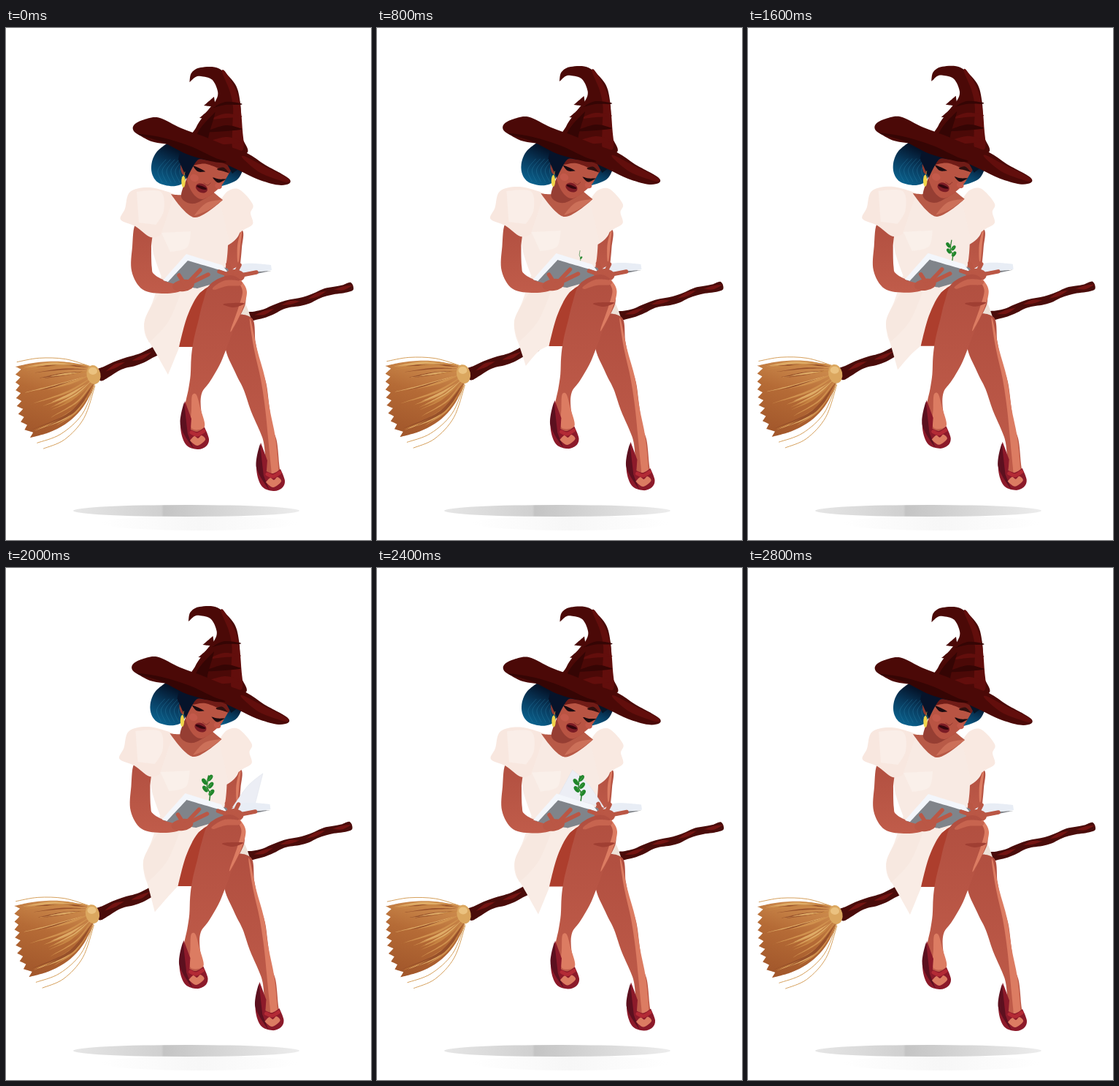
Animation, 500 px wide and 700 px high, one loop 3000 ms. Source, as an HTML page:

```html
<!DOCTYPE html>
<html lang="en">
<head>
<meta charset="utf-8">
<title>Reading on a broom</title>
<style>
html, body { margin: 0; width: 100%; height: 100%; overflow: hidden; background: #fff; }
svg { display: block; width: 500px; height: 700px; }
</style>
</head>
<body>
<svg viewBox="0 0 500 700">
  <defs>
    <linearGradient id="bristle" x1=".7" y1="0" x2=".4" y2="1">
      <stop offset="0" stop-color="#d09050"/><stop offset=".45" stop-color="#b56b36"/><stop offset="1" stop-color="#a2572b"/>
    </linearGradient>
    <linearGradient id="hair" x1=".7" y1="0" x2=".3" y2="1">
      <stop offset=".25" stop-color="#04142a"/><stop offset=".6" stop-color="#083c60"/><stop offset="1" stop-color="#0a6490"/>
    </linearGradient>
    <linearGradient id="skin" x1="0" y1="0" x2="0" y2="1">
      <stop offset="0" stop-color="#b14f40"/><stop offset="1" stop-color="#c05c4a"/>
    </linearGradient>
    <linearGradient id="ground">
      <stop offset="0" stop-color="#e6e6e6"/><stop offset=".39" stop-color="#d0d0d0"/>
      <stop offset=".4" stop-color="#c4c4c4"/><stop offset="1" stop-color="#ededed"/>
    </linearGradient>
    <linearGradient id="glow">
      <stop offset="0" stop-color="#fff"/><stop offset=".5" stop-color="#f7f7f7"/><stop offset="1" stop-color="#fff"/>
    </linearGradient>
  </defs>
  <ellipse cx="265" cy="677" rx="135" ry="10" fill="url(#glow)"/>
  <ellipse cx="247" cy="660" rx="155" ry="8" fill="url(#ground)"/>
  <g id="figure"></g>
</svg>
<script>
const SKIN = 'url(#skin)', SKIN_LIGHT = '#dc7c62', SKIN_DARK = '#a03f33';
const HAT = '#4b0907', HAT_LIGHT = '#620e0c', HAT_DARK = '#350504';
const figure = document.getElementById('figure');
let layer = figure;

let seed = 7;
const random = () => (seed = seed * 16807 % 2147483647) / 2147483647;
const mix = (a, b, k) => a + (b - a) * k;

function add(tag, attrs) {
  const el = document.createElementNS('http://www.w3.org/2000/svg', tag);
  for (const key in attrs) el.setAttribute(key, attrs[key]);
  return layer.appendChild(el);
}

// "x,y" points; a trailing "!" marks a sharp corner.
const parse = text => text.trim().split(/\s+/).map(s => [...s.replace('!', '').split(',').map(Number), s.endsWith('!')]);

function curve(pts, closed) {
  const n = pts.length;
  const at = i => closed ? pts[(i + n) % n] : pts[Math.max(0, Math.min(n - 1, i))];
  const pull = (i, axis) => at(i)[2] ? 0 : (at(i + 1)[axis] - at(i - 1)[axis]) / 6;
  let d = `M${pts[0][0]},${pts[0][1]}`;
  for (let i = 0; i < (closed ? n : n - 1); i++) {
    const a = at(i), b = at(i + 1);
    d += `C${a[0] + pull(i, 0)},${a[1] + pull(i, 1)} ${b[0] - pull(i + 1, 0)},${b[1] - pull(i + 1, 1)} ${b[0]},${b[1]}`;
  }
  return d + (closed ? 'Z' : '');
}

const shape = (fill, text) => add('path', { fill, d: curve(parse(text), true) });
const stroke = (color, width, pts) => add('path', {
  fill: 'none', stroke: color, 'stroke-width': width, 'stroke-linecap': 'round', d: curve(pts, false)
});
const line = (color, width, text) => stroke(color, width, parse(text));
const oval = (fill, cx, cy, rx, ry, turn = 0) =>
  add('ellipse', { fill, cx, cy, rx, ry, transform: `rotate(${turn} ${cx} ${cy})` });

// Thickened axis: each point is "x,y,halfWidth".
function limb(fill, axis) {
  const pts = typeof axis === 'string' ? parse(axis) : axis;
  const sides = [[], []];
  pts.forEach(([x, y, w], i) => {
    const a = pts[Math.max(0, i - 1)], b = pts[Math.min(pts.length - 1, i + 1)];
    const dx = b[0] - a[0], dy = b[1] - a[1], k = w / Math.hypot(dx, dy);
    sides[0].push([x - dy * k, y + dx * k]);
    sides[1].unshift([x + dy * k, y - dx * k]);
  });
  return add('path', { fill, d: curve([...sides[0], ...sides[1]], true) });
}

// Point on the bristle fan: u runs across it, r from the knot to the tips.
function fan(u, r) {
  const bezier = (a, b, c) => a * (1 - r) ** 2 + 2 * b * r * (1 - r) + c * r * r;
  return [bezier(116 + 5 * u, 70 + 33 * u, 13 + 20 * u ** 4), bezier(464 + 22 * u, 448 + 99 * u, 463 + 97 * u)];
}

function stick(from, to) {
  const axis = [];
  for (let x = from; x <= to; x += 12) {
    const u = (x - 126) / 348;
    axis.push([x, 474 - 122 * u - 6 * Math.sin(Math.PI * u) + 1.5 * Math.sin(x / 9), mix(7.5, 4.5, Math.sqrt(u)) + random()]);
  }
  limb('#4a0c0a', axis);
  for (let i = 1; i < axis.length - 2; i += 3) {
    limb('#741412', axis.slice(i, i + 3).map(([x, y], j) => [x, y - 1, j === 1 ? 2.5 : .3]));
  }
}

function drawBroom() {
  stick(126, 222);
  stick(330, 474);
  const outline = [];
  for (let r = 0; r < 1; r += .2) outline.push(fan(0, r));
  for (let i = 0; i <= 18; i++) outline.push([...fan(i / 18, i % 2 ? .93 + .03 * random() : 1), true]);
  for (let r = .8; r >= 0; r -= .2) outline.push(fan(1, r));
  add('path', { fill: 'url(#bristle)', d: curve(outline, true) });

  const colors = ['#deab66', '#d0914e', '#c88644', '#97502a'];
  for (let i = 0; i < 34; i++) {
    const u = i < 8 ? random() * .15 : random(), near = random() * .25, far = mix(.5, .92, random());
    limb(colors[i % 4], [0, .5, 1].map(k => [...fan(u, mix(near, far, k)), k === .5 ? .8 + random() : .2]));
  }
  for (const u of [-.06, 1.08, 1.16]) stroke('#d6a05c', 1, [0, .35, .7, .98].map(r => fan(u, r)));
  oval('#dba75f', 120, 474, 9.5, 13, -12);
  oval('#ebc280', 119, 469, 6, 5);
}

function drawShoe(dx, dy) {
  const parent = layer;
  layer = add('g', { transform: `translate(${dx} ${dy})` });
  shape('#8c1a2a', '245,510! 239,544 246,569 262,576 274,572 278,562 272,546! 262,552 253,549! 254,534!');
  shape('#5c101f', '244,512! 239,544 257,575! 249,555!');
  shape(SKIN_LIGHT, '252,564! 258,558 263,561 268,557 273,563 262,571');
  line('#b32a35', 5, '254,553 262,556 271,551');
  layer = parent;
}

function drawBackLeg() {
  shape('#eee2d8', '310,372! 326,374 337,402! 318,396!');
  limb(SKIN, '323,396,14 321,432,21 331,465,18 341,490,16 348,520,13 356,548,9 362,566,9 365,595,9 367,618,8');
  limb(SKIN_LIGHT, '335,402,1 342,440,2 352,480,3 358,520,3 364,560,5 368,600,5 369,616,4');
  drawShoe(104, 57);
}

function drawFrontLeg() {
  shape('#ad3e2d', '237,436! 248,395 264,364 284,350! 290,400 258,436!');
  limb(SKIN, '315,343,10 304,362,27 295,385,27 288,405,25 279,434,23 273,456,20 266,479,14 259,497,9.5 256,520,11 260,548,12 262,562,10');
  limb(SKIN_LIGHT, '321,347,2 327,361,3 321,384,3 309,412,1');
  limb('#c7644f', '285,356,2 301,349,4 321,349,3');
  limb(SKIN_DARK, '299,378,1 312,379,3 325,377,1');
  limb(SKIN_LIGHT, '258,502,3 260,520,6 263,546,9');
  drawShoe(0, 0);
}

const skirtPath = (x, y) => curve(parse(
  `212,340! 201,374 190,400 191,420 ${mix(201, x, .3) - 6},${mix(428, y, .2)} ${x},${y}! ${mix(x, 237, .55)},${y - 20} 238,435! 250,390 270,356 296,330!`), true);

function drawDress() {
  skirt = add('path', { fill: '#f9ece5' });
  shape('#f7e8e0', '213,359! 190,400 196,430! 222,402 240,360!');
  limb(SKIN, '314,276,10 312,300,11 310,322,11 311,338,8');
  limb(SKIN_LIGHT, '322,280,1 319,298,2 318,318,1');
  shape('#f8eae3', '228,226! 198,285! 203,312 213,340! 225,352 290,352 304,297! 320,280 318,238 296,234! 258,258');
  shape('#f9e9e1', '293,237! 304,223 320,221 338,241 335,253 338,268 324,277 306,292!');
  limb(SKIN, '189,268,11 186,300,13 186,330,14 195,347,13 218,354,9 242,351,7');
  shape('#f8e7df', '231,227! 197,218 170,224 163,247 157,262 177,271 198,286 212,283!');
  shape('#faeee8', '179,224! 212,224 216,250 205,269! 182,266!');
  shape('#faf0ea', '213,280! 253,278! 248,300 225,306!');
}

function drawHead() {
  shape('url(#hair)', '232,150! 206,170 199,193 208,211 232,216 247,205 254,165!');
  shape('url(#hair)', '294,174! 327,186! 316,208 284,219!');
  for (let x = 211; x < 242; x += 6) line('#2b7ea4', .4, `${x + 8},180 ${x - 3},195 ${x + 3},211`);
  shape('#b85a47', '247,200! 246,226 226,227! 258,259 297,235! 281,222!');
  shape('#963e33', '248,205! 240,231 258,240 285,225!');
  limb('#cc7059', '260,255,1 276,244,5 294,236,1');
  shape('#b95443', '245,176! 247,205 256,226 269,234 286,224 299,210 308,185 280,168');
  oval('#92392f', 244, 189, 5, 12);
  shape('#701c17', '246,176! 252,188 275,186 306,199! 309,180 276,168!');
  shape('#06132a', '236,180! 246,160 278,166! 277,180 262,181 248,206!');
  shape('#071426', '296,174! 327,186! 310,199!');
  limb('#1b0b10', '257,189,.5 264,194,2.5 272,196,.5');
  limb('#1b0b10', '284,205,.5 291,209,2.5 300,207,.5');
  limb('#30100f', '290,193,1 297,193,2.5 304,197,.5');
  line('#8b352d', 1, '280,212 276,215 271,212');
  oval('#c45a4b', 258, 205, 6, 5, 25);
  oval('#c45a4b', 291, 216, 5, 4, 25);
  oval('#7b1c25', 268, 219, 8.5, 6, 25);
  limb('#35070d', '262,216,1 268,218,2 274,220,1');
  line('#c59b34', .8, '245,197 243,205');
  oval('#f0d54b', 243, 210, 2.7, 8);
}

function drawHat() {
  limb(HAT, '252,73,.5 257,64,4 267,60,6 287,63,9 302,82,13 304,101,17 299,120,24 292,142,32 289,168,38');
  limb(HAT_LIGHT, '298,60,2 310,84,4 316,108,5 317,140,7 318,166,7');
  for (let i = 0; i < 4; i++) {
    const y = 100 + i * 17, reach = 15 + i * 6;
    limb(i % 2 ? HAT_LIGHT : HAT_DARK, `${301 - reach},${y + 8},.5 301,${y + 3},${2 + i} 321,${y + 4},1`);
    shape(HAT, `${300 - reach},${y - 6}! ${286 - reach},${y + 6}! ${302 - reach},${y + 8}!`);
  }
  limb(HAT_DARK, '285,118,1 272,141,7 266,160,8');
  limb(HAT, '175,137,4 186,137,11 205,139,17 235,149,13 265,161,14 295,171,12 325,183,13 350,197,11 375,207,8 388,210,3');
  limb(HAT_LIGHT, '326,177,2 350,193,5 375,204,4 387,209,2');
  limb(HAT_DARK, '185,146,1 215,153,3 250,167,6 285,180,3 300,183,1');
}

function drawBook() {
  page = add('path', { fill: '#eceef5', stroke: '#dfe2eb', 'stroke-width': .6 });
  const parent = layer;
  plant = layer = add('g', {});
  line('#267a2c', 1.5, '280,320 281,309 277,300 279,285');
  leaves = Array.from({ length: 5 }, (_, i) => {
    const side = i % 2 ? -1 : 1, leaf = add('g', {});
    layer = leaf;
    oval('#20852b', 279 + side * 4 - i / 2, 308 - i * 5, 2.9, 5, side * 38);
    line('#6bbd5f', .6, `279,${311 - i * 5} ${279 + side * 4},${306 - i * 5}`);
    layer = plant;
    return leaf;
  });
  layer = parent;
  shape('#80848a', '217,346! 249,314! 322,334! 363,332! 300,345! 262,356! 238,352!');
  shape('#f3f6fb', '215,345! 247,309! 296,324! 304,334! 249,318! 222,347!');
  shape('#e8edf5', '309,331! 324,323 341,322 363,324! 364,331! 322,335!');
}

function drawHands() {
  oval('#ba5745', 243, 352, 15, 8, -8);
  for (const tip of ['237,338', '266,331', '277,337']) line('#ba5745', 5.5, `246,352 ${tip}`);
  oval('#ba5745', 313, 339, 14, 9);
  for (const tip of ['304,323', '320,324', '343,334', '292,333']) line('#ba5745', 5.5, `312,340 ${tip}`);
}

let skirt, page, plant, leaves;
[drawBroom, drawBackLeg, drawDress, drawBook, drawHands, drawFrontLeg, drawHead, drawHat].forEach(part => part());

function pagePath(time) {
  const angle = (time - 1784) * .2075 * Math.PI / 180;
  if (angle < 0 || angle > Math.PI) return '';
  const c = Math.cos(angle), near = [312, 328, true], far = [293 + 70 * c, 317 + 10 * c, true];
  const tip = [308 + 64 * c, 327 - 64 * Math.sin(angle), true];
  return curve([near, [mix(near[0], tip[0], .5), mix(near[1], tip[1], .5) - 6], tip, far], true);
}

function draw(now) {
  const time = Math.floor(now % 3000 / 200) * 200;
  const swayX = -.8 * (1 - Math.cos(2 * Math.PI * time / 1400));
  const swayY = -1.2 * Math.sin(Math.PI * time / 2800);
  figure.setAttribute('transform', `translate(${swayX} ${swayY})`);

  const flutter = time < 2400 ? Math.sin(Math.PI * time / 1200) ** 2 : 0;
  skirt.setAttribute('d', skirtPath(222 - 22 * flutter, 474 - 22 * flutter * (1 - time / 2400)));
  page.setAttribute('d', pagePath(time));

  const grown = Math.max(0, Math.min(1, (time - 200) / 1800)) ** .8;
  const size = grown * Math.max(0, Math.min(1, (2800 - time) / 400));
  plant.setAttribute('transform', `translate(280 320) scale(${size}) translate(-280 -320)`);
  leaves.forEach((leaf, i) => leaf.setAttribute('visibility', time >= 600 + i * 280 ? 'visible' : 'hidden'));
}

const start = performance.now();
function tick() {
  draw(performance.now() - start);
  requestAnimationFrame(tick);
}
tick();
</script>
</body>
</html>
```
